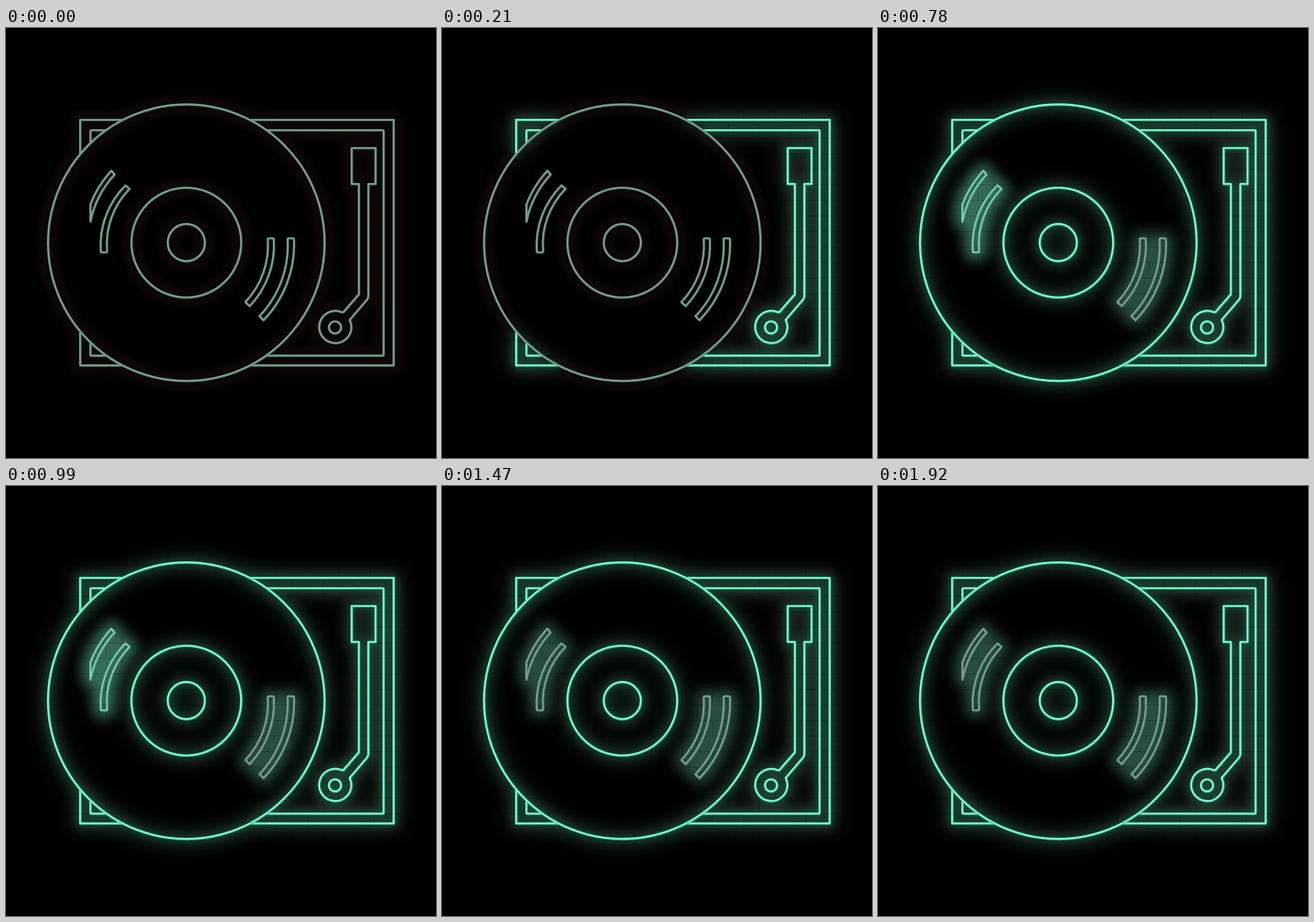
An HTML page for the animation above (2250 ms loop, 748 by 748 pixels).

```html
<!DOCTYPE html>
<html lang="en">
<head>
<meta charset="utf-8">
<title>Neon turntable</title>
<style>
html, body { margin: 0; width: 100%; height: 100%; overflow: hidden; background: #000; }
svg { display: block; width: 100%; height: 100%; fill: none; stroke-linejoin: round; }
</style>
</head>
<body>
<svg viewBox="0 0 748 748">
  <defs>
    <mask id="outside" maskUnits="userSpaceOnUse" x="0" y="0" width="748" height="748">
      <path d="M0 0H748V748H0Z" fill="#fff"/>
      <circle cx="313.8" cy="373.7" r="240.5" fill="#000"/>
    </mask>
    <pattern id="bricks" width="54" height="54" patternUnits="userSpaceOnUse">
      <path d="M0 3H54M0 30H54M12 3V30M39 30V57" stroke="#000" stroke-width="2"/>
    </pattern>

    <g id="deck" mask="url(#outside)">
      <rect x="129.2" y="160" width="545.3" height="427.2"/>
      <rect x="147" y="178" width="510" height="392.2" rx="2"/>
      <path d="M614 271.5H601.5V209H643V271.5H630.5V466Q630.5 470 628 473L598 508Q601 514 601 521A28 28 0 1 1 584 494.5H587L614 463.5Z"/>
      <circle cx="572.5" cy="521" r="10.5"/>
    </g>
    <g id="disc">
      <circle cx="313.8" cy="373.7" r="240.5"/>
      <circle cx="313.8" cy="373.5" r="95.5"/>
      <circle cx="313.8" cy="373.5" r="32.3"/>
    </g>
    <g id="left">
      <path d="M183.5 248.5L189 255A171 171 0 0 0 147 337V307A180 180 0 0 1 183.5 248.5Z"/>
      <path d="M208 274L215 280A137 137 0 0 0 176 388Q176 390.5 173 390.5H168Q165 390.5 165 388A147 147 0 0 1 208 274Z"/>
    </g>
    <g id="right">
      <path d="M455.5 368Q455.5 366 458 366H463.5Q466 366 466 368A154 154 0 0 1 424 484L416.5 477A144 144 0 0 0 455.5 368Z"/>
      <path d="M490 368Q490 366 492 366H498.5Q501 366 501 368A189 189 0 0 1 448 508.5L441 501.5A178 178 0 0 0 490 368Z"/>
    </g>
  </defs>
</svg>
<script>
const svg = document.querySelector('svg');
const LOOP = 2250, STEP = 30;

// lit spans of each tube, in ms
const spans = {
  deck: [[180, LOOP]],
  disc: [[390, LOOP]],
  left: [[780, 990], [1680, 1890]],
  right: [[1230, 1440]]
};
const names = Object.keys(spans);

const blur = s => `<filter id="blur${s}" filterUnits="userSpaceOnUse" x="0" y="0" width="748" height="748"
  color-interpolation-filters="sRGB"><feGaussianBlur stdDeviation="${s}"/></filter>`;
const use = (id, color, width, s) =>
  `<use href="#${id}" stroke="${color}" stroke-width="${width}"${s ? ` filter="url(#blur${s})"` : ''}/>`;
const layer = (id, content) => `<g class="${id}">${content}</g>`;
// the core sits up and left of the tube, as if lit from there
const tube = (id, edge, core) => use(id, edge, 4.2)
  + `<g transform="translate(-.4 -.5)">${use(id, core, 2.2)}</g>`;

const glow = {
  deck: use('deck', '#20382c', 18, 16) + use('deck', '#1a654b', 5, 6),
  disc: use('disc', '#17382b', 20, 16) + use('disc', '#1a654b', 5, 6)
    + use('left', '#294f40', 24, 12) + use('right', '#294f40', 24, 12),
  left: use('left', '#468c70', 24, 12),
  right: use('right', '#468c70', 24, 12)
};

svg.innerHTML += [5, 6, 12, 16].map(blur).join('')
  + use('deck', '#0c0706', 34, 5) + use('disc', '#0c0706', 34, 5)
  + names.map(id => layer(id, glow[id])).join('')
  + '<path d="M0 0H748V748H0Z" fill="url(#bricks)" opacity=".15"/>'
  + names.map(id => tube(id, '#587f6e', '#7ba391')
    + layer(id, tube(id, '#46c496', '#86ffdb'))).join('');

// each switch passes through one half-bright step
function level(t, [on, off]) {
  if (t < on || t >= off + STEP) return 0;
  return t < on + STEP || t >= off ? 0.5 : 1;
}

const layers = names.map(id => [spans[id], svg.querySelectorAll('.' + id)]);

function draw() {
  const t = performance.now() % LOOP;
  for (const [list, groups] of layers) {
    const opacity = Math.max(...list.map(span => level(t, span)));
    groups.forEach(g => g.setAttribute('opacity', opacity));
  }
  requestAnimationFrame(draw);
}
draw();
</script>
</body>
</html>
```
